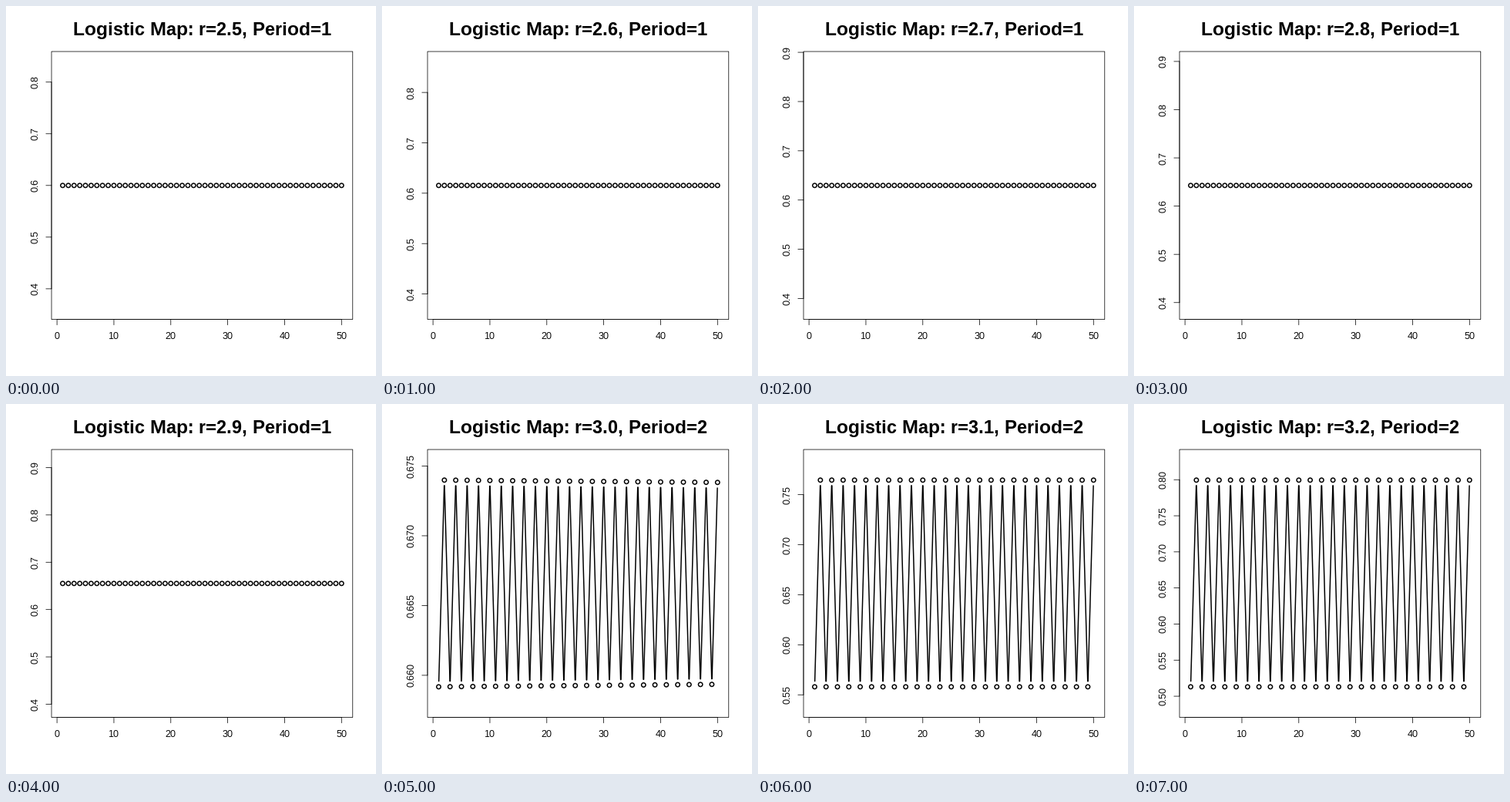
A matplotlib script for the animation above (8 s loop, 480 by 480 pixels).

```python
import math

import matplotlib.pyplot as plt
import numpy as np
from matplotlib.animation import FuncAnimation
from matplotlib.collections import LineCollection, PatchCollection
from matplotlib.patches import Circle, Rectangle

SIZE = 480
DPI = 72  # one point is one pixel
LINE = 14.4  # height of one margin line
LEFT, RIGHT = 4.1 * LINE, SIZE - 2.1 * LINE
TOP, BOTTOM = 4.1 * LINE, SIZE - 5.1 * LINE
TICK = LINE / 2
GAP = LINE / 2
THIN, THICK = 0.75, 1.5
COUNT, BURN_IN = 50, 1000

plt.rcParams.update({
    "font.family": "Liberation Sans",
    "text.hinting": "default",
    "text.hinting_factor": 1,
    "path.snap": False,
    "path.simplify": False,
})

fig = plt.figure(figsize=(SIZE / DPI, SIZE / DPI), dpi=DPI, facecolor="white")
ax = fig.add_axes([0, 0, 1, 1])


def logistic(r):
    x = 0.5
    for _ in range(BURN_IN):
        x = r * x * (1 - x)
    values = []
    for _ in range(COUNT):
        values.append(x)
        x = r * x * (1 - x)
    return np.array(values)


def limits(values):
    low, high = values.min(), values.max()
    span = high - low
    pad = 0.1 * span if span > 1e-6 else 0.4 * high
    low, high = low - pad, high + pad
    margin = 0.04 * (high - low)
    return low - margin, high + margin


def ticks(low, high):
    """Round tick values inside the range, and their number of decimals."""
    cell = (high - low) / 5
    base = 10 ** math.floor(math.log10(cell))
    step = base
    for factor, bias in ((2, 0.8), (5, 1.7), (10, 0.8)):
        if factor * base - cell < bias * (cell - step):
            step = factor * base
    first, last = math.ceil(low / step), math.floor(high / step)
    decimals = max(0, -math.floor(math.log10(step) + 1e-9))
    return np.arange(first, last + 1) * step, decimals


def scale(v, low, high, start, end):
    return start + (v - low) / (high - low) * (end - start)


def segments(items, width):
    ax.add_collection(LineCollection(items, colors="black", linewidths=width,
                                     capstyle="round"), autolim=False)


def label(x, y, text, size=12, **style):
    ax.text(x, y, text, size=size, ha="center", va="baseline",
            rotation_mode="anchor", **style)


def draw_axes(x_range, y_range):
    ax.add_patch(Rectangle((LEFT, TOP), RIGHT - LEFT, BOTTOM - TOP,
                           fill=False, ec="black", lw=THIN))
    values, decimals = ticks(*x_range)
    xs = scale(values, *x_range, LEFT, RIGHT)
    segments([[(xs[0], BOTTOM), (xs[-1], BOTTOM)]], THIN)
    segments([[(x, BOTTOM), (x, BOTTOM + TICK)] for x in xs], THIN)
    for x, v in zip(xs, values):
        label(x, 432, f"{v:.{decimals}f}")

    values, decimals = ticks(*y_range)
    ys = scale(values, *y_range, BOTTOM, TOP)
    segments([[(LEFT, ys[0]), (LEFT, ys[-1])]], THIN)
    segments([[(LEFT, y), (LEFT - TICK, y)] for y in ys], THIN)
    for y, v in zip(ys, values):
        label(42, y, f"{v:.{decimals}f}", rotation=90)


def draw_series(points):
    """Open circles joined by lines that stop short of them."""
    joins = []
    for a, b in zip(points[:-1], points[1:]):
        cut = GAP / np.hypot(*(b - a))
        if cut < 0.5:
            joins.append([a + cut * (b - a), b - cut * (b - a)])
    segments(joins, THICK)
    rings = [Circle(p, 0.375 * LINE / 2) for p in points]
    ax.add_collection(PatchCollection(rings, facecolor="none",
                                      edgecolor="black", linewidth=THICK))


def draw(i):
    ax.clear()
    ax.set(xlim=(0, SIZE), ylim=(SIZE, 0))
    ax.axis("off")
    r = 2.5 + i / 10
    period = 1 if i < 5 else 2
    index = np.arange(1, COUNT + 1)
    values = logistic(r)
    margin = 0.04 * (COUNT - 1)
    x_range = 1 - margin, COUNT + margin
    y_range = limits(values)
    draw_axes(x_range, y_range)
    draw_series(np.column_stack([scale(index, *x_range, LEFT, RIGHT),
                                 scale(values, *y_range, BOTTOM, TOP)]))
    label((LEFT + RIGHT) / 2, 38, f"Logistic Map: r={r:.1f}, Period={period}",
          size=24, weight="bold")
    return []


anim = FuncAnimation(fig, draw, frames=8, interval=1000, init_func=lambda: [],
                     repeat=True)
plt.show()
```
